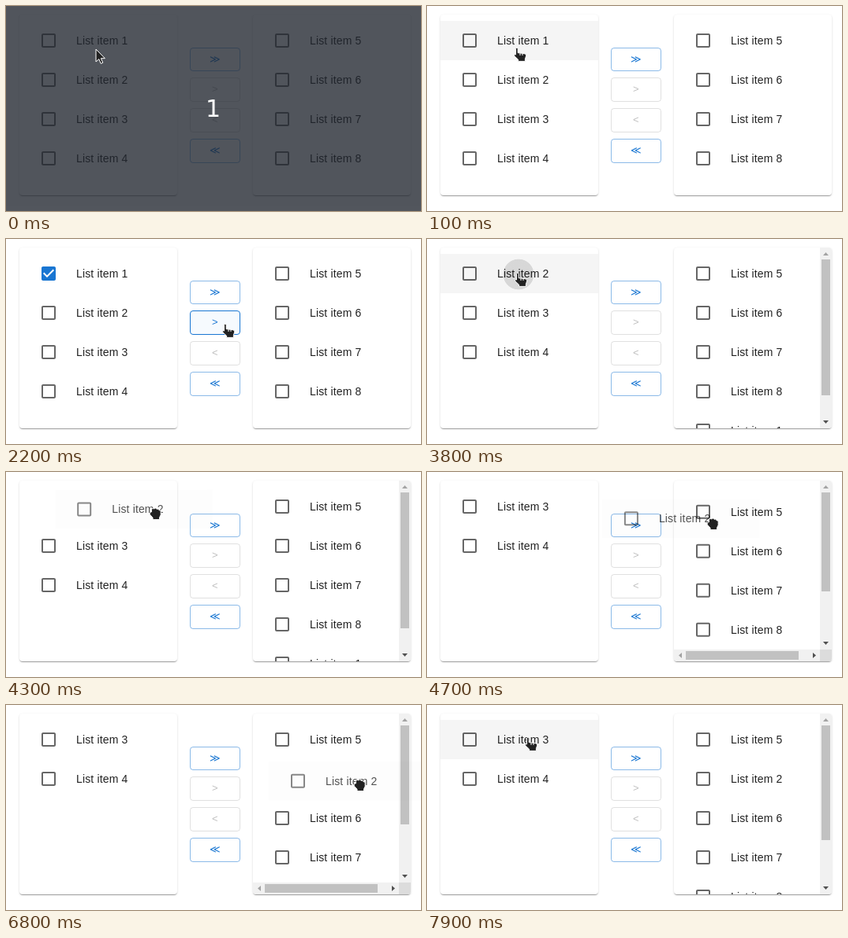
An HTML page that plays this animation: 526 by 261 pixels, repeating every 8 s.

```html
<!DOCTYPE html>
<html lang="en">
<head>
<meta charset="utf-8">
<title>Transfer list</title>
<style>
html, body { margin: 0; width: 100%; height: 100%; overflow: hidden; background: #fff; }
#stage {
  position: relative; width: 526px; height: 261px; overflow: hidden;
  font: 14px/20px "Liberation Sans", "DejaVu Sans", Arial, sans-serif;
  letter-spacing: .15px; color: rgba(0, 0, 0, .87);
}
#stage * { position: absolute; box-sizing: border-box; }
.card {
  top: 11px; width: 200px; height: 230px; border-radius: 4px; background: #fff; overflow: hidden;
  box-shadow: 0 2px 1px -1px rgba(0,0,0,.2), 0 1px 1px rgba(0,0,0,.14), 0 1px 3px rgba(0,0,0,.12);
}
#left { left: 17px; }
#right { left: 313px; }
.view { inset: 0; overflow: hidden; }
.item { left: 0; top: 8px; width: 200px; height: 50px; white-space: nowrap; }
.item span { left: 72px; top: 15px; }
.item svg { left: 25px; top: 13px; width: 24px; height: 24px; fill: rgba(0, 0, 0, .6); }
.item svg.on { fill: #1976d2; }
#drag { left: 17px; top: 19px; opacity: .78; background: rgba(0, 0, 0, .012); }
.btn {
  left: 233px; width: 64px; height: 30.75px; border: 1px solid rgba(25, 118, 210, .5); border-radius: 4px;
  color: #1976d2; font-size: 13px; font-weight: 500; line-height: 28px; letter-spacing: .37px; text-align: center;
}
.btn.off { color: rgba(0, 0, 0, .26); border-color: rgba(0, 0, 0, .12); }
.btn.hover { border-color: #1976d2; background-color: rgba(25, 118, 210, .04); }
#bars { left: 0; top: 0; }
#cover { inset: 0; background: rgba(33, 38, 47, .78); }
#count {
  left: 0; width: 525px; top: 113px; text-align: center; color: #fff;
  font: 30px/35px "DejaVu Sans", sans-serif; letter-spacing: 0;
}
#cursor { left: 0; top: 0; overflow: visible; fill: #222; stroke: #fff; stroke-linejoin: round; }
</style>
</head>
<body>
<div id="stage">
  <div class="card" id="left"><div class="view"></div></div>
  <div class="card" id="right">
    <div class="view"></div>
    <svg id="bars" width="200" height="230">
      <rect x="185" width="15" height="230" fill="#f1f1f1"/>
      <rect id="thumb" x="187" y="15" width="11" fill="#c1c1c1"/>
      <path d="M189 10l3.5-4 3.5 4z" fill="#a3a3a3"/>
      <path id="down" d="M189 220l3.5 4 3.5-4z" fill="#505050"/>
      <g id="hbar">
        <rect y="215" width="185" height="15" fill="#f1f1f1"/>
        <rect x="185" y="215" width="15" height="15" fill="#dcdcdc"/>
        <rect x="15" y="217" width="143" height="11" fill="#c1c1c1"/>
        <path d="M10 219l-4 3.5 4 3.5z" fill="#a3a3a3"/>
        <path d="M176 219l4 3.5-4 3.5z" fill="#505050"/>
      </g>
    </svg>
  </div>
  <div id="cover"><div id="count">1</div></div>
  <svg id="cursor" width="20" height="20"><path/></svg>
</div>
<script>
const LOOP = 8000, STEP = 100, ROW = 50, LAG = 70, SLIDE = 150;
const CHECK = 1100, SEND = 2400, MOVE = 2500, PRESS = 3800, GRAB = 4100, DROP = 6800, SETTLE = 7000;
const $ = id => document.getElementById(id);
const stage = $('stage');

const BOX = 'M19 5v14H5V5h14m0-2H5c-1.1 0-2 .9-2 2v14c0 1.1.9 2 2 2h14c1.1 0 2-.9 2-2V5c0-1.1-.9-2-2-2z';
const TICKED = 'M19 3H5c-1.11 0-2 .9-2 2v14c0 1.1.89 2 2 2h14c1.11 0 2-.9 2-2V5c0-1.1-.89-2-2-2zm-9 14l-5-5 1.41-1.41L10 14.17l7.59-7.59L19 8l-9 9z';

// each shape is drawn with its hot spot at 0,0
const SHAPES = {
  arrow: 'M0 0V16L3.8 12.6 6.2 18.3 8.8 17.2 6.4 11.7H11.4Z',
  hand: 'M-1.5-.4C-1.5-2.2 1.2-2.2 1.2-.4V4.6L9 5.6C11 6 11.8 7 11.6 8.8L10.4 12.4V15.4H1.6V13.2L-3 9C-4 7.4-2.8 6-1.5 7ZM4 5V8M7 5.4V8',
  fist: 'M2.5-1.6C2.5-4 5-4.4 5.8-3 6.6-4.4 8.8-4.2 9.2-2.6 10.4-3.4 12-2.8 12.1-1.2 13.4-1.6 14.2-.8 14.2.6V4.5L12.6 8V10.6H4V8.2L.4 4.2C-.4 2.6.2.8 2.5.8Z'
};

// pointer moves: from time, to time, goal
const HOME = [114, 55];
const MOVES = [
  [300, 400, 109, 55], [1200, 1700, 292, 122], [1700, 2000, 278, 110],
  [3000, 3400, 95, 42], [3400, 3500, 115, 45], [4000, 4700, 355, 63],
  [4900, 5200, 446, 112], [5300, 5600, 443, 173], [5800, 6300, 441, 99],
  [7500, 7800, 95, 43], [7800, 7900, 128, 43]
];

const clamp = (v, lo, hi) => Math.min(hi, Math.max(lo, v));
const mix = (a, b, p) => a + (b - a) * p;

function pointer(t) {
  let [x, y] = HOME;
  for (const [from, to, gx, gy] of MOVES) {
    const p = clamp((t - from) / (to - from), 0, 1) ** 1.5;
    x = mix(x, gx, p);
    y = mix(y, gy, p);
  }
  return [x, y];
}

// the dragged row trails the pointer
const held = t => pointer(clamp(t, GRAB, DROP) - LAG);

// rows slide linearly after the test on the dragged row changes
function slide(t, test) {
  let hits = 0;
  for (let k = 0; k < SLIDE; k += 10) hits += test(...held(t - k));
  return ROW * hits * 10 / SLIDE;
}

function addItem(parent, n) {
  const el = document.createElement('div');
  el.className = 'item';
  el.innerHTML = `<svg viewBox="0 0 24 24"><path d="${BOX}"/></svg><span>List item ${n}</span>`;
  parent.append(el);
  return el;
}

function place(el, shown, x, y) {
  el.style.display = shown ? '' : 'none';
  el.style.transform = `translate(${x}px,${y}px)`;
}

const leftView = document.querySelector('#left .view');
const rightView = document.querySelector('#right .view');
const leftItems = [1, 2, 3, 4].map(n => addItem(leftView, n));
const rightItems = [5, 6, 7, 8, 1].map(n => addItem(rightView, n));
const dropped = addItem(rightView, 2);
const drag = addItem(stage, 2);
drag.id = 'drag';
stage.insertBefore(drag, $('cover'));

const buttonTop = i => 52.5 + i * 38.75;
const buttons = ['≫', '>', '<', '≪'].map((label, i) => {
  const el = document.createElement('div');
  el.className = 'btn';
  el.style.top = buttonTop(i) + 'px';
  el.textContent = label;
  stage.insertBefore(el, drag);
  return el;
});

const ripple = (x, y, r, rgb, alpha) =>
  `radial-gradient(circle at ${x}px ${y}px, rgba(${rgb},${alpha}) ${r}px, transparent ${r + .7}px)`;

function rowRipple(t) {
  const press = (t - PRESS) / 100, click = (t - CHECK) / 100;
  if (press >= 0 && t < GRAB) return ripple(99, 26, 19 + 44 * press, '0,0,0', .12 + .06 * press);
  if (click >= 0 && click < 3) return ripple(92, 35, 20 + 34 * click, '0,0,0', .1 - .03 * click);
  return 'none';
}

function buttonRipple(t) {
  const k = (t - SEND) / 100;
  return k >= 0 && k < 3 ? ripple(44, 18, 12 + 18 * k, '25,118,210', .16 - .05 * k) : 'none';
}

function render(t) {
  const [x, y] = pointer(t);
  const covered = t < STEP, moved = t >= MOVE, settled = t >= SETTLE;
  const dragging = t >= GRAB && !settled;
  const ticked = t >= CHECK && !moved;
  const hbar = !settled && slide(t, hx => hx >= 313) > 0;
  let over = null;

  const put = (el, shown, left, top) => {
    place(el, shown, 0, top);
    if (shown && x >= left && x < left + 200 && y >= top + 19 && y < top + 19 + ROW) over = el;
  };

  const closed = slide(t, hx => hx >= 217);
  leftItems.forEach((el, i) => {
    const shown = i === 0 ? !moved : i !== 1 || t < GRAB;
    put(el, shown, 17, i * ROW - (moved ? ROW : 0) - (i > 1 ? closed : 0));
  });
  const box = leftItems[0].firstChild;
  box.setAttribute('class', ticked ? 'on' : '');
  box.firstChild.setAttribute('d', ticked ? TICKED : BOX);

  rightItems.forEach((el, i) => {
    const gap = slide(t, (hx, hy) => hx >= 313 && Math.round((hy - 45) / ROW) <= i);
    put(el, i < 4 || moved, 313, i * ROW + gap);
  });
  put(dropped, settled, 313, ROW);

  buttons.forEach((el, i) => {
    const enabled = i === 0 || i === 3 || (i === 1 && ticked);
    const top = buttonTop(i);
    const hit = enabled && x >= 233 && x < 297 && y >= top && y < top + 30.75;
    if (hit) over = el;
    el.className = 'btn' + (enabled ? '' : ' off') + (hit && !dragging ? ' hover' : '');
  });
  buttons[1].style.backgroundImage = buttonRipple(t);

  const active = covered || dragging ? null : over;
  [...leftItems, ...rightItems, dropped].forEach(el => {
    el.style.backgroundColor = el === active ? 'rgba(0,0,0,.04)' : '';
    el.style.backgroundImage = el === active && el.parentNode === leftView ? rowRipple(t) : 'none';
  });

  // after the release the row glides into its slot
  const [hx, hy] = held(t);
  const glide = clamp((t - DROP + STEP) / (SETTLE - DROP + STEP), 0, 1);
  place(drag, dragging, mix(hx - 115, 296, glide), mix(hy - 45, ROW, glide));

  $('bars').style.display = moved ? '' : 'none';
  $('hbar').style.display = hbar ? '' : 'none';
  $('thumb').setAttribute('height', hbar ? 126 : settled ? 146 : 173);
  $('down').setAttribute('transform', `translate(0 ${hbar ? -15 : 0})`);
  rightView.style.bottom = hbar ? '15px' : '0';
  rightView.style.right = moved ? '15px' : '0';

  $('cover').style.display = covered ? '' : 'none';
  const shape = dragging ? 'fist' : active ? 'hand' : 'arrow';
  $('cursor').firstElementChild.setAttribute('d', SHAPES[shape]);
  $('cursor').style.transform = `translate(${Math.round(x)}px,${Math.round(y)}px)`;
}

const start = performance.now();
function tick() {
  const t = (performance.now() - start) % LOOP;
  render(Math.floor(t / STEP) * STEP);
  requestAnimationFrame(tick);
}
tick();
</script>
</body>
</html>
```
